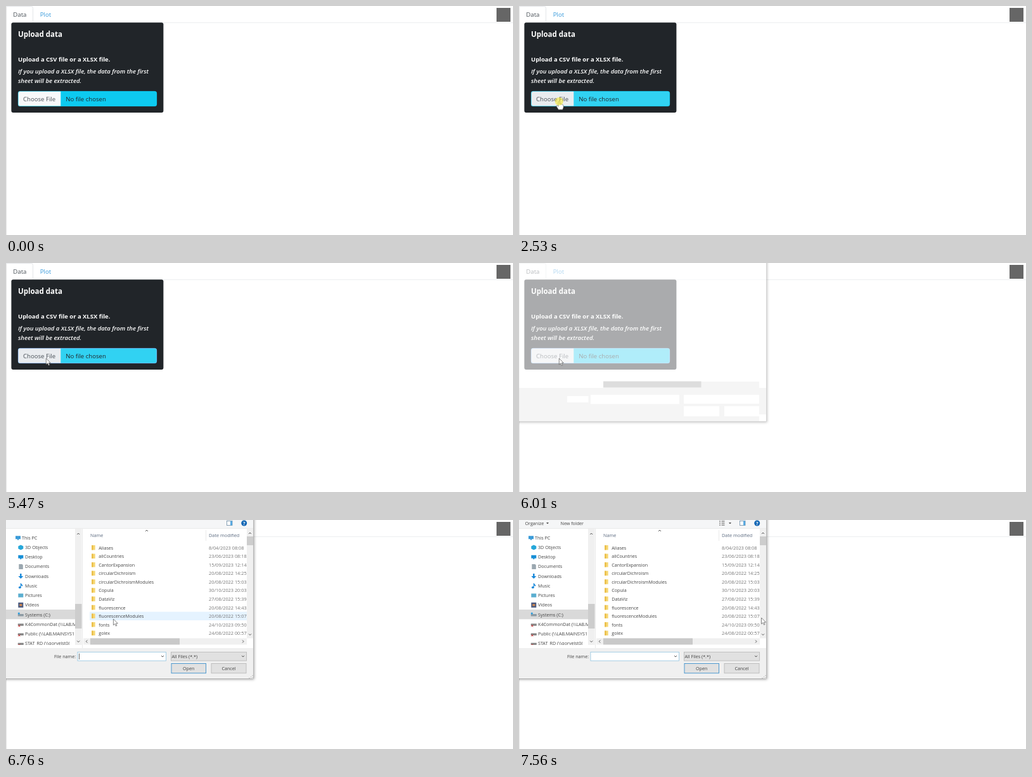
These frames come from a looping animation (800x363 px, 8000 ms). An HTML page:

```html
<!DOCTYPE html>
<html lang="en">
<head>
<meta charset="utf-8">
<title>Upload data</title>
<style>
  html, body { margin: 0; width: 100%; height: 100%; overflow: hidden; background: #fff; }
  svg { display: block; width: 100%; height: 100%; font-family: "Open Sans", "Noto Sans", sans-serif; }
  .web { font-size: 9.6px; }
  .win { font-size: 7.15px; fill: #444; }
  .date { font-size: 7.35px; fill: #777; }
  .head { font-size: 7.3px; fill: #5c6b80; }
</style>
</head>
<body>
<svg id="stage" viewBox="0 0 800 363">
  <defs>
    <clipPath id="treeClip"><rect y="14" width="109" height="184"/></clipPath>
    <clipPath id="listClip"><rect x="121" y="14" width="259" height="174"/></clipPath>
    <clipPath id="fieldClip"><rect x="19" y="135" width="219" height="24" rx="3.5"/></clipPath>
    <filter id="shadow" x="-10%" y="-10%" width="120%" height="120%">
      <feDropShadow dx="1" dy="1.5" stdDeviation="2.2" flood-opacity=".4"/>
    </filter>
  </defs>

  <rect width="800" height="363" fill="#fff"/>
  <path d="M.5 0V363" stroke="#e4e4e4"/>
  <path d="M43 26.5H800" stroke="#eceef0"/>
  <path d="M0 .5H39.5Q42.5 .5 42.5 3.5V26" fill="none" stroke="#e3e6e9"/>
  <rect x="774" y="3" width="22" height="22" fill="#666"/>

  <g id="page" class="web">
    <text x="11.3" y="17.4" fill="#495057">Data</text>
    <text x="53.8" y="17.4" fill="#3498db">Plot</text>
    <rect x="8.4" y="26.3" width="240" height="142.8" rx="3" fill="#212529"/>
    <g fill="#fff">
      <text x="19" y="49.4" font-size="11.5" font-weight="700">Upload data</text>
      <text x="19" y="87.6" font-size="9.45" font-weight="700">Upload a CSV file or a XLSX file.</text>
      <g font-size="9.55" font-style="italic" font-weight="600">
        <text x="19" y="106.5">If you upload a XLSX file, the data from the first</text>
        <text x="19" y="121.5">sheet will be extracted.</text>
      </g>
    </g>
    <rect id="ring" x="17.5" y="133.5" width="222" height="27" rx="5" fill="none" stroke="#0d6efd" stroke-opacity=".3" stroke-width="3"/>
    <g clip-path="url(#fieldClip)">
      <rect id="field" x="19" y="135" width="219" height="24"/>
      <rect id="choose" x="19" y="135" width="67.3" height="24"/>
    </g>
    <rect id="border" x="19.3" y="135.3" width="218.4" height="23.4" rx="3.3" fill="none" stroke-width=".65"/>
    <text x="27" y="150.9" fill="#495057">Choose File</text>
    <text x="94.2" y="150.9" fill="#212529">No file chosen</text>
  </g>

  <g id="dialog">
    <rect x="-8" y="-8" width="398.5" height="259" fill="#fff" filter="url(#shadow)"/>
    <path d="M0 251H390.5V0" fill="none" stroke="#aaa" stroke-width=".8"/>
    <g id="skeleton">
      <path d="M0 198H379V188H287V198H390V250.5H0Z" fill="#f0f0f0"/>
      <path d="M133 187.5H287.5V197.5H133Z" fill="#c9c9c9"/>
      <path d="M76 211H109.5V221H76ZM113 209H253V223.5H113ZM260 209H379V223H260ZM260 227H316V243H260ZM324 227H379V243H324ZM379 240H390V250.5H379Z" fill="#fff"/>
    </g>
    <g id="shell"></g>
    <g id="files"></g>
    <g id="toolbar" class="win">
      <text x="9.5" y="7.8">Organize</text>
      <path d="M43 4H47L45 6.3Z"/>
      <text x="65.5" y="7.8">New folder</text>
      <path d="M316 2H318M316 5H318M316 8H318M319.5 2H324.5M319.5 5H324.5M319.5 8H324.5" stroke="#888" stroke-width="1.3"/>
      <path d="M331 4H335L333 6.3Z"/>
    </g>
  </g>

  <g id="cursor">
    <path id="arrow" d="M0 0V9.8L2.3 7.7L3.9 11.2L5.5 10.5L4 7.1H7Z" fill="#fff" stroke="#444" stroke-width=".65"/>
    <path id="hand" d="M-1.2 .8Q0 -1.2 1.2 .8V4.2Q2.7 3.3 3.3 4.7Q4.7 4 5.2 5.3Q6.8 5 6.8 7V9.5L5.5 13H-1L-4.3 7.8Q-4.2 5.8 -2.5 6.8L-1.2 8Z" fill="#fff" stroke="#555" stroke-width=".6"/>
    <circle id="press" r="6.5" fill="#f5ea20" fill-opacity=".55"/>
    <g id="spinner" transform="translate(9.3 0)">
      <circle r="4.2" fill="#e4f1fb" stroke="#2a7fd0" stroke-width="1.9"/>
      <path id="sweep" d="M0 -4.2A4.2 4.2 0 0 1 4.2 0" fill="none" stroke="#7cc4f5" stroke-width="1.9"/>
    </g>
  </g>
</svg>
<script>
const LOOP = 8000;
const $ = id => document.getElementById(id);
const text = (x, y, s, cls = 'win') => `<text x="${x}" y="${y}" class="${cls}">${s}</text>`;
const box = (x, y, w, h, fill, stroke = 'none') =>
  `<rect x="${x}" y="${y}" width="${w}" height="${h}" fill="${fill}" stroke="${stroke}" stroke-width=".8"/>`;
const chevron = (x, y, turn) =>
  `<path d="M-2 -1L0 1L2 -1" transform="translate(${x} ${y}) rotate(${turn})" fill="none" stroke="#555"/>`;

const tree = [
  ['This PC', '#3a9bd8'], ['3D Objects', '#25a7d9'], ['Desktop', '#168ed6'], ['Documents', '#9aa7b0'],
  ['Downloads', '#1687d9'], ['Music', '#1687d9'], ['Pictures', '#5aaed0'], ['Videos', '#4a5a80'],
  ['Systems (C:)', '#8d9aa3'], ['K4CommonDat (\\\\LAB.M', '#888'],
  ['Public (\\\\LAB.MAINSYS1', '#888'], ['STAT_RD (\\\\qorvelst0(', '#888']
];
const folders = [
  ['Aliases', '8/04/2023 08:08'], ['allCountries', '23/06/2023 08:18'], ['CantorExpansion', '15/09/2023 12:14'],
  ['circularDichroism', '20/08/2022 14:25'], ['circularDichroismModules', '20/08/2022 15:03'],
  ['Copula', '30/10/2023 20:03'], ['DataViz', '27/08/2022 15:39'], ['fluorescence', '20/08/2022 14:43'],
  ['fluorescenceModules', '20/08/2022 15:07'], ['fonts', '24/10/2023 09:50'], ['golex', '24/08/2022 00:57']
];

// Small icon shapes, drawn around their own centre
const shapes = {
  screen: 'M-4 -3H4V2H1V3.5H-1V2H-4Z',
  cube: 'M0 -4L4 -2V2L0 4L-4 2V-2Z',
  sheet: 'M-3 -4H2L3.5 -2.5V4H-3Z',
  down: 'M-1.2 -4H1.2V0H4L0 4L-4 0H-1.2Z',
  note: 'M-.5 -4H.6Q1 -2 3 -1V1Q1.6 -.6 .6 -.6V2.5A2 1.6 0 1 1 -.5 1.2Z',
  photo: 'M-4 -3H4V3H-4Z',
  film: 'M-4 -4H4V4H-4Z',
  drive: 'M-4.5 -1H4.5V2.5H-4.5Z'
};
const treeShapes = ['screen', 'cube', 'screen', 'sheet', 'down', 'note', 'photo', 'film', 'drive', 'drive', 'drive', 'drive'];
const treeRow = ([label, color], i) => {
  const y = 28.2 + i * 15.23, x = i ? 23.3 : 19;
  const mark = i > 8 ? `<path d="M${x - 4} ${y + 1}l3 3m0 -3l-3 3" stroke="#c33" stroke-width="1"/>`
    : i === 8 ? `<circle cx="${x - 3}" cy="${y - 2}" r="1.6" fill="#2b9fe0"/>`
    : i === 7 ? box(x - 2, y - 1.5, 4, 3, '#d98a4a') : '';
  return `<path d="${shapes[treeShapes[i]]}" transform="translate(${x} ${y})" fill="${color}"/>` + mark +
    text(i ? 30 : 25, y + 2.6, label);
};

$('shell').innerHTML =
  box(0, 0, 390, 251, '#fff') + box(0, 0, 390, 13, '#f5f6f7') + box(0, 203, 390, 47.6, '#f0f0f0') +
  '<path d="M0 13.4H390M120.5 14V203" stroke="#e5e5e5" stroke-width=".8"/>' +
  box(0, 142, 109, 15.3, '#d9d9d9') + `<g clip-path="url(#treeClip)">${tree.map(treeRow).join('')}</g>` +
  box(109, 14, 10.5, 184, '#f0f0f0') + box(109, 133, 10.5, 39, '#cdcdcd') +
  chevron(114.2, 22, 180) + chevron(114.2, 192.5, 0) +
  box(122, 187.5, 258, 10, '#f0f0f0') + box(133, 187.5, 141, 10, '#c9c9c9') +
  chevron(127.3, 192.5, 90) + chevron(374, 192.5, -90) +
  box(380, 14, 10, 173.5, '#f0f0f0') + box(380, 26, 10, 14, '#cdcdcd') +
  chevron(385, 21, 180) + chevron(385, 181.5, 0) +
  text(76, 219, 'File name:') + box(113, 209.3, 139.5, 13.8, '#fff', '#8fc3df') + chevron(247, 216, 0) +
  box(260.4, 209.3, 119, 13.8, '#e1e1e1', '#b5b5b5') + text(261.5, 219, 'All Files (*.*)') + chevron(374, 216, 0) +
  box(261, 227.4, 54.5, 15.4, '#e1e1e1', '#2986c8') + text(279, 238, 'Open') +
  box(324, 227.4, 55, 15.4, '#e1e1e1', '#b5b5b5') + text(340.5, 238, 'Cancel') +
  '<path id="caret" d="M115.5 211.5V221" stroke="#444" stroke-width=".8"/>' +
  '<path d="M389 246v1m0 2v1m-2.5 -1.5v1m-2.5 .5v1" stroke="#999"/>' +
  box(348.5, 1.5, 8.5, 7, '#fff', '#6b8ba4') + box(354, 1.5, 3, 7, '#58a9e0') +
  '<circle cx="375.7" cy="5" r="4.5" fill="#1267b5"/>' +
  '<text x="375.7" y="7.7" font-size="7.5" font-weight="700" fill="#fff" text-anchor="middle">?</text>';

$('files').innerHTML =
  text(133, 27, 'Name', 'head') + text(320, 27, 'Date modified', 'head') + chevron(222, 17, 180) +
  '<path d="M315.5 16V33" stroke="#e5e5e5" stroke-width=".8"/>' +
  '<rect id="hover" x="132" y="145.5" width="248" height="13.5" fill="#e5f3ff"/>' +
  `<g clip-path="url(#listClip)">${folders.map(([name, date], i) => {
    const y = 44 + i * 13.55;
    return box(135.3, y - 4, 5.4, 7.5, '#f7d774') + box(135.3, y - 4, 2, 7.5, '#e9b93f') +
      text(146.3, y + 2.7, name) + text(320, y + 2.7, date, 'date');
  }).join('')}</g>`;

// Rows are [time, value, value...]
const route = [
  [410, 736, 351], [480, 590, 303], [540, 400, 240], [610, 306.5, 217.5], [1070, 306.5, 217.5],
  [1300, 215, 190], [1560, 120, 163], [1840, 69, 147], [1910, 63.3, 151.2],
  [6560, 63.3, 151.2], [6800, 190, 158], [7040, 347, 153.5], [7250, 382.5, 155]
];
const spin = [[3290, 0], [3560, 100], [3960, 100], [4720, 460], [5470, 820]];

function at(rows, t) {
  const next = rows.findIndex(row => row[0] > t);
  if (next < 0) return rows.at(-1).slice(1);
  if (next === 0) return rows[0].slice(1);
  const a = rows[next - 1], b = rows[next], k = (t - a[0]) / (b[0] - a[0]);
  return a.slice(1).map((v, i) => v + (b[i + 1] - v) * k);
}
const ramp = (t, start, length) => Math.min(1, Math.max(0, (t - start) / length));
const blend = (a, b, k) => `rgb(${a.map((v, i) => Math.round(v + (b[i] - v) * k))})`;
const show = (id, on) => $(id).style.display = on ? '' : 'none';

function draw(t) {
  const [x, y] = at(route, t);
  const hover = ramp(t, 1600, 150);
  const focus = ramp(t, 2590, 150);
  $('field').setAttribute('fill', blend([13, 202, 240], [49, 210, 242], hover));
  $('choose').setAttribute('fill', blend([248, 249, 250], [233, 236, 239], hover));
  $('border').setAttribute('stroke', blend([13, 202, 240], [134, 183, 254], focus));
  $('ring').style.opacity = focus * (1 - ramp(t, 3960, 140));

  $('cursor').setAttribute('transform', `translate(${x} ${y})`);
  show('cursor', t >= 410);
  const hand = t >= 1640 && t < 2940;
  show('hand', hand);
  show('arrow', !hand);
  show('press', t >= 2380 && t < 2800);
  show('spinner', t >= 2940 && t < 5470);
  $('sweep').setAttribute('transform', `rotate(${at(spin, t)[0]})`);

  show('dialog', t >= 5930);
  $('dialog').style.opacity = ramp(t, 5900, 180);
  show('skeleton', t < 6290);
  show('shell', t >= 6290);
  show('files', t >= 6430);
  show('toolbar', t >= 7150);
  show('hover', t >= 6700 && t < 7230);
  show('caret', t >= 6760 && t < 7300);
}

const start = performance.now();
function tick() {
  draw((performance.now() - start) % LOOP);
  requestAnimationFrame(tick);
}
tick();
</script>
</body>
</html>
```
